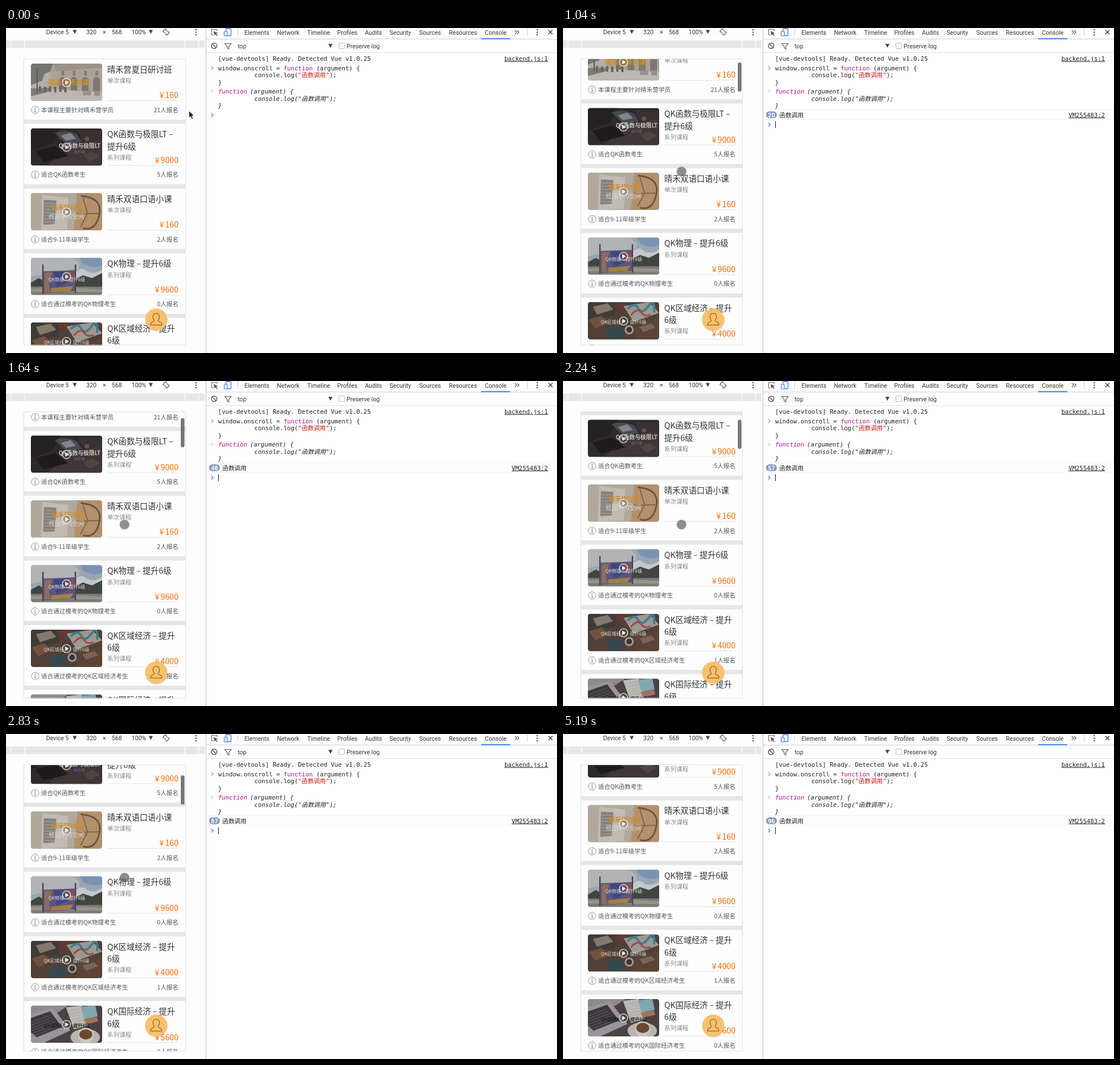
An HTML page that plays this animation: 974 by 575 pixels, repeating every 5630 ms.

```html
<!DOCTYPE html>
<html lang="zh-CN">
<head>
<meta charset="utf-8">
<title>Scroll handler calls</title>
<style>
html, body { margin: 0; width: 100%; height: 100%; overflow: hidden; background: #fdfdfd; }
svg { display: block; width: 100%; height: 100%; }
text { white-space: pre; }
.zh { font-family: "Noto Sans CJK SC", "Noto Sans CJK", sans-serif; }
.ui { font: 10.6px Roboto, "Liberation Sans", sans-serif; fill: #333; }
.mono { font: 10.68px "DejaVu Sans Mono", "Noto Sans CJK SC", "Noto Sans CJK", monospace; fill: #222; }
.slanted { font-style: italic; }
.badge { font: bold 11px Roboto, "Liberation Sans", sans-serif; fill: #fff; }
.title { font-size: 14.3px; font-weight: 350; fill: #333; }
.price { font-size: 14.3px; font-weight: 500; fill: #ff6a00; text-anchor: end; }
.kind { font-size: 10.7px; fill: #888; }
.note { font-size: 10.7px; fill: #555; }
.end { text-anchor: end; }
.mid { text-anchor: middle; }
.key { fill: #aa0d91; }
.str { fill: #c41a16; }
</style>
</head>
<body>
<svg id="stage" viewBox="0 0 974 575"></svg>
<script>
const LOOP = 5630, PITCH = 114.5;

const rect = (x, y, w, h, fill, extra = '') =>
  `<rect x="${x}" y="${y}" width="${w}" height="${h}" fill="${fill}" ${extra}/>`;
const path = (d, fill, extra = '') => `<path d="${d}" fill="${fill}" ${extra}/>`;
const line = (d, color, width = 1) => path(d, 'none', `stroke="${color}" stroke-width="${width}"`);
const disc = (x, y, r, fill, extra = '') => `<circle cx="${x}" cy="${y}" r="${r}" fill="${fill}" ${extra}/>`;
const oval = (x, y, rx, ry, fill) => `<ellipse cx="${x}" cy="${y}" rx="${rx}" ry="${ry}" fill="${fill}"/>`;
const text = (x, y, cls, body, extra = '') => `<text x="${x}" y="${y}" class="${cls}" ${extra}>${body}</text>`;
const repeat = (n, draw) => Array.from({ length: n }, (_, i) => draw(i)).join('');
const caption = (x, y, size, fill, body, weight = 700) =>
  text(x, y, 'zh mid', body, `font-size="${size}" font-weight="${weight}" fill="${fill}"`);

// Thumbnails, each drawn in a 126 x 66 box.
const street = () =>
  rect(0, 0, 126, 66, '#b3aea6') +
  path('M34 8 126 0V52L34 47Z', '#aca196') +
  path('M0 0H40L34 14 24 18 20 30 0 38Z', '#74766f') +
  path('M40 0H126V7L44 14Z', '#9b9289') +
  repeat(4, i => path(`M${50 + i * 20} 49v-21q6 -9 12 0v21z`, '#7d7770') +
    rect(54 + i * 20, 13, 5, 8, '#847d76')) +
  path('M0 47 50 46 126 51V66H0Z', '#bcb7b0') +
  path('M0 44 32 43 34 49 0 58Z', '#7e7c75') +
  repeat(6, i => rect(14 + i * 9, 40 + i % 2, 4, 10, '#66645f')) +
  rect(10, 8, 2, 44, '#5c5b56') +
  path('M92 48h14v8h-14zM112 48h10v9h-10z', '#96918a') +
  caption(66, 38, 12, '#cf9128', '晴禾营研讨课');

const darkDesk = () =>
  rect(0, 0, 126, 66, '#2f2a2a') +
  path('M0 0H52L40 26 0 40Z', '#252223') +
  path('M42 8Q62 0 82 11L90 24 62 27Z', '#474a4f') +
  path('M53 13 70 8 80 18 62 22Z', '#7f858b') +
  path('M66 30 126 18V66H30Z', '#3f3735') +
  path('M82 4H126V20L92 22Z', '#383231') +
  path('M8 40 44 31 66 49 22 60Z', '#1e1b1c') +
  path('M92 48l16 -7 14 8 -17 10z', '#4d4542') +
  disc(99, 19, 4, '#5d5350') +
  caption(86, 34.5, 9.8, '#c9c6c9', 'QK函数与极限LT') +
  caption(86, 43, 5.5, '#7765ae', '提升6级', 500);

const workTable = () =>
  rect(0, 0, 126, 66, '#b3916c') +
  path('M0 0H82L76 66H0Z', '#b1a89c') +
  path('M20 3 66 8 64 64 18 66Z', '#c0bbb3') +
  path('M23 12 45 13 42 55 22 56Z', '#85817c') +
  repeat(7, i => line(`M24 ${18 + i * 5.5}l18 .5`, '#b3afa8', .9)) +
  line('M88 5Q127 8 121 38T92 62', '#6d543f', 3) +
  line('M80 37 121 36M92 8 100 36 88 60', '#806348', 2) +
  caption(64, 30, 10.8, '#cf8a2c', '晴禾研讨课') +
  caption(63, 44.5, 10.4, '#dedbd5', '校园学习空间', 500);

const billboard = () =>
  rect(0, 0, 126, 66, '#9aa5b2') +
  path('M0 0H70Q92 7 84 20L0 33Z', '#b1b3b5') +
  path('M86 0H126V14Q108 20 92 10Z', '#7b93b3') +
  path('M75 30q12 -16 23 -7t28 -2v18H75z', '#c3c8cc') +
  path('M0 44 14 36 24 42 78 38 92 31 108 36 126 27V52H0Z', '#40453f') +
  rect(0, 51, 126, 15, '#7d7b74') +
  path('M0 55 50 52 126 56V61L0 60Z', '#98948c') +
  rect(20, 12, 2.5, 52, '#4b4644') + rect(77.5, 12, 2.5, 50, '#4b4644') +
  path('M22 24 78 22V59L22 63Z', '#5a5480') +
  path('M24 26h14l-6 20 3 15H24z', '#8c6c5d') +
  path('M40 25h18l9 18-21 9z', '#40477b') +
  path('M58 26 77 24v16l-12 3z', '#7d535d') +
  path('M36 54 75 50 70 59 36 61Z', '#a37f47') +
  caption(63.5, 41, 8.2, '#e2dfdf', 'QK物理·提升6级', 500);

const toolDesk = () =>
  rect(0, 0, 126, 66, '#4f4038') +
  path('M0 0H61L46 24 0 32Z', '#3f3b38') +
  path('M9 8 35 2 45 13 16 22Z', '#85786c') +
  path('M46 2 66 0 68 11 52 16Z', '#643733') +
  path('M63 7 108 0 126 19 81 35Z', '#9c9892') +
  line('M70 12q13 -13 19 -1t18 -4 10 11', '#3f7f8e', 4) +
  line('M76 23q12 -14 18 -5t17 4', '#a14a42', 3) +
  path('M2 31 24 24 37 36 13 47Z', '#715240') +
  path('M32 48 58 44 65 61 37 66Z', '#33494f') +
  disc(73, 49, 8, '#a09a93') + disc(73, 49, 5, '#3b3431') +
  path('M86 41 126 28V66H80Z', '#5b4437') +
  path('M91 44 112 38 119 45 98 53Z', '#7c6355') +
  caption(63, 37.5, 8.1, '#e0dcd7', 'QK区域经济·提升6级', 500);

const coffeeDesk = () =>
  rect(0, 0, 126, 66, '#4a4342') +
  path('M0 0H66L48 12 0 20Z', '#8f8a89') +
  path('M0 14 39 4 70 44 22 66H0Z', '#98959a') +
  path('M0 22 34 10 55 38 10 56 0 47Z', '#3b393d') +
  repeat(6, i => line(`M0 ${30 + i * 5}L${34 + i * 3} ${17 + i * 4}`, '#7d7a80', .6)) +
  path('M62 3 90 0 102 36 76 42Z', '#bcb9b2') +
  path('M88 2 114 0 118 19 95 24Z', '#7fa7ad') +
  path('M93 24 117 20 119 28 98 33Z', '#a3725f') +
  repeat(6, i => line(`M${68 + i * 2} ${9 + i * 5}l19 -3`, '#9b9b96', .6)) +
  oval(96, 56, 26, 15, '#b9b3ae') + disc(97, 53, 14, '#cbc5bf') + oval(97, 51, 11.5, 9, '#6c4933') +
  caption(63.5, 38.5, 8.1, '#232123', 'QK国际经济·提升6级');

const courses = [
  [['晴禾营夏日研讨班'], '单次课程', 160, '本课程主要针对晴禾营学员', 21, street],
  [['QK函数与极限LT –', '提升6级'], '系列课程', 9000, '适合QK函数考生', 5, darkDesk],
  [['晴禾双语口语小课'], '单次课程', 160, '适合9-11年级学生', 2, workTable],
  [['QK物理 – 提升6级'], '系列课程', 9600, '适合通过模考的QK物理考生', 0, billboard],
  [['QK区域经济 – 提升', '6级'], '系列课程', 4000, '适合通过模考的QK区域经济考生', 1, toolDesk],
  [['QK国际经济 – 提升', '6级'], '系列课程', 5600, '适合通过模考的QK国际经济考生', 0, coffeeDesk],
];

const card = ([titles, kind, price, note, joined, photo], i) =>
  `<g transform="translate(0 ${i * PITCH})">` +
  rect(32, 162, 286, 7.5, '#e6e6e6') +
  `<g transform="translate(44 63)"><g clip-path="url(#thumb)">${photo()}</g>` +
  disc(63, 33.5, 7.3, '#555', 'fill-opacity=".3" stroke="#fff" stroke-width="1.1"') +
  path('M60.8 29.8v7.4l6 -3.7z', '#fff') + '</g>' +
  titles.map((t, k) => text(179, 78.8 + k * 21.5, 'zh title', t)).join('') +
  text(179, 76 + titles.length * 21, 'zh kind', kind) +
  text(305, 124, 'zh price', `¥<tspan dx="2">${price}</tspan>`) +
  line('M179 128.5H305', '#e4e4e4') +
  disc(51.5, 145, 6.6, 'none', 'stroke="#888" stroke-width=".9"') +
  disc(51.5, 141.7, .9, '#777') + line('M50.3 144h1.3v4.3M50 148.5h3.2', '#777', .9) +
  text(62, 148.7, 'zh note', note) +
  text(305, 148.7, 'zh note end', joined + '人报名') + '</g>';

const dots = x => repeat(3, i => disc(x, 3 + i * 4.5, 1.3, '#555'));
const down = (x, y, s = 4) => path(`M${x - s} ${y - s}h${2 * s}l${-s} ${s * 2}z`, '#444');

const deviceBar = () =>
  rect(0, 0, 353, 575, '#fdfdfd') +
  text(71, 11, 'ui', 'Device 5') + down(121.5, 7, 3.6) +
  text(142, 11, 'ui', '320') + text(171, 11, 'ui', '×') + text(187, 11, 'ui', '568') +
  text(222, 11, 'ui', '100%') + down(256, 7, 3.6) +
  `<g transform="rotate(-45 283 7)">${rect(280.3, 2.3, 5.4, 9.4, 'none', 'rx="1" stroke="#666"')}</g>` +
  line('M277.6 8A5.6 5.6 0 0 1 284 1.5M288.4 6A5.6 5.6 0 0 1 282 12.5', '#666') + dots(336) +
  rect(0, 22, 351, 13.5, '#e7e7e7') +
  [8.5, 33, 316, 340.5].map(x => rect(x - .8, 22, 1.6, 13.5, '#fbfbfb')).join('');

const tabs = { Elements: 421.5, Network: 479, Timeline: 532.5, Profiles: 585.5, Audits: 634.5,
  Security: 678, Sources: 730.5, Resources: 783, Console: 846.5 };

const toolsPanel = () =>
  rect(353, 0, 621, 575, '#fefefe') + line('M353.5 0V575', '#bdbdbd') +
  line('M354 19.5H974', '#d0d0d0') + line('M354 43.5H974', '#e2e2e2') +
  line('M373 5V2.5H363.5V12H367', '#666', 1.2) + path('M367 5.5 374.5 9l-3 1 2.6 3.2-1.4 1-2.5-3.2-1.7 2.4z', '#555') +
  rect(388.7, 1, 9, 12.5, 'none', 'rx="1" stroke="#3b78e7" stroke-width="1.3"') +
  rect(385.7, 6, 5.5, 8, '#fefefe', 'rx=".8" stroke="#3b78e7" stroke-width="1.2"') +
  line('M409.5 0V14M921.5 0V14', '#ccc') +
  Object.entries(tabs).map(([name, x]) => text(x, 11.5, 'ui', name)).join('') +
  rect(840, 18, 51.5, 2, '#4285f4') +
  line('M899.5 4l3.3 3.3-3.3 3.3M903.5 4l3.3 3.3-3.3 3.3', '#555', 1.2) + dots(939) +
  line('M959 3.8l7 7M966 3.8l-7 7', '#444', 1.6) +
  disc(368, 31.5, 4.8, 'none', 'stroke="#555" stroke-width="1.4"') + line('M364.7 28.2l6.6 6.6', '#555', 1.4) +
  path('M387 27.5h11l-4 5v4.5l-3 -1.8v-2.7z', 'none', 'stroke="#555" stroke-width="1.2"') +
  text(409.5, 35.5, 'ui', 'top') + down(573.5, 31.5, 3.6) +
  rect(588.5, 26.5, 10, 10, '#fff', 'rx="1.5" stroke="#bbb"') + text(602, 35.5, 'ui', 'Preserve log');

const link = (y, label) =>
  text(958, y, 'mono end', label, 'text-decoration="underline"');

const consoleRows = () =>
  text(375, 57.7, 'mono', '[vue-devtools] Ready. Detected Vue v1.0.25') + link(57.7, 'backend.js:1') +
  line('M363 68l3.2 3-3.2 3', '#999', 1.1) +
  text(375, 74.7, 'mono', 'window.onscroll = <tspan class="key">function</tspan> (argument) {') +
  text(439, 87.2, 'mono', 'console.log(<tspan class="str">"函数调用"</tspan>);') +
  text(375, 99.7, 'mono', '}') +
  line('M365 109.2l-2.8 2.8 2.8 2.8', '#aaa') + disc(367, 112, .8, '#aaa') +
  text(375, 115.7, 'mono slanted', '<tspan class="key">function</tspan><tspan dx="-1.5"> (argument) {</tspan>') +
  text(439, 128.5, 'mono slanted', 'console.log("函数调用");') +
  text(375, 140.7, 'mono slanted', '}') +
  `<g id="log">` + line('M354 144.5H974M354 161.5H974', '#f3f3f3') +
  rect(359, 147.5, 19, 12, '#8097bd', 'rx="6"') +
  text(368.5, 157.5, 'badge mid', '', 'id="count"') +
  text(382.5, 157.5, 'mono', '函数调用') + link(157.5, 'VM255483:2') + '</g>' +
  `<g id="prompt">` + line('M363 151l3 3-3 3', '#3d7de0', 1.4) + rect(375, 148, 1, 12, '#111', 'id="caret"') + '</g>';

const profileButton = () =>
  disc(265.8, 517, 20, '#000', 'opacity=".13"') + disc(265.5, 515.7, 19.5, '#fcc068', 'opacity=".96"') +
  path('M262.3 517.5Q259.3 513.5 259.8 510Q260.5 504.8 265.5 504.8T271.2 510Q271.7 513.5 268.7 517.5Q269 519 272.5 520.3Q275.5 521.6 275.5 525.5H255.5Q255.5 521.6 258.5 520.3Q262 519 262.3 517.5Z',
    'none', 'stroke="#74531f" stroke-width="1.1"');

const stage = document.getElementById('stage');
stage.innerHTML =
  `<defs><clipPath id="thumb">${rect(0, 0, 126, 66, '#000', 'rx="4.5"')}</clipPath>` +
  `<clipPath id="view">${rect(31, 54, 287, 507.5, '#000')}</clipPath></defs>` +
  deviceBar() +
  `<g clip-path="url(#view)"><g id="list">${courses.map(card).join('')}</g></g>` +
  rect(31.5, 54.5, 286, 506.5, 'none', 'stroke="#e2e2e2"') +
  profileButton() +
  rect(309, 0, 6.5, 51.5, '#555', 'id="thumbBar" rx="3.2"') +
  toolsPanel() + consoleRows() +
  disc(0, 0, 8.8, '#595959', 'id="touch" fill-opacity=".68" stroke="#fff" stroke-opacity=".45"') +
  path('M0 0V12.6L2.9 9.9 5 14.5 7.2 13.5 5.2 9.1H9.1Z', '#111', 'id="arrow" stroke="#fff" stroke-width=".9"');

const part = Object.fromEntries(['list', 'thumbBar', 'log', 'count', 'prompt', 'caret', 'touch', 'arrow']
  .map(id => [id, document.getElementById(id)]));

// [time, scroll offset, calls logged]
const scrolls = [
  [0, 0, 0], [750, 5, 4], [890, 19, 12], [1040, 36, 20], [1190, 53, 28], [1340, 66, 36], [1490, 76, 43],
  [1640, 81, 48], [2090, 94, 52], [2240, 109, 57], [2390, 125, 65], [2540, 139, 73], [2680, 149, 80],
  [2830, 155, 87], [3120, 161, 92], [3270, 166.5, 96],
];
// [time, pointer part, x, y]
const pointers = [
  [0, 'arrow', 323.5, 146.5], [150, 'touch', 232, 225], [300, 'touch', 209.5, 254],
  [3570, 'arrow', 540, 325], [3710, 'arrow', 780, 412], [3860, 'arrow', 868.5, 444.5],
  [4010, 'arrow', 902, 474], [4160, 'arrow', 917, 506], [4300, 'arrow', 920, 536],
  [4450, 'arrow', 918, 563], [4600, '', 0, 0],
];
const carets = [[0, 0], [300, 1], [3860, 0], [4300, 1], [4750, 0], [5190, 1]];
const barFade = [[0, 0], [750, 1], [3860, .5], [4010, 0]];

const at = (steps, t) => steps.findLast(s => s[0] <= t);
const show = (el, on) => el.setAttribute('visibility', on ? 'visible' : 'hidden');
const move = (el, x, y) => el.setAttribute('transform', `translate(${x} ${y})`);

function render(t) {
  const [, offset, calls] = at(scrolls, t);
  const [, pointer, x, y] = at(pointers, t);
  move(part.list, 0, -offset);
  move(part.thumbBar, 0, 57.3 + offset * .103);
  part.thumbBar.setAttribute('opacity', .8 * at(barFade, t)[1]);
  part.count.textContent = calls;
  show(part.log, calls > 0);
  move(part.prompt, 0, calls > 0 ? 17 : 0);
  show(part.caret, at(carets, t)[1]);
  for (const name of ['touch', 'arrow']) {
    show(part[name], name === pointer);
    move(part[name], x, y);
  }
}

const start = performance.now();
function tick() {
  render((performance.now() - start) % LOOP);
  requestAnimationFrame(tick);
}
tick();
</script>
</body>
</html>
```
